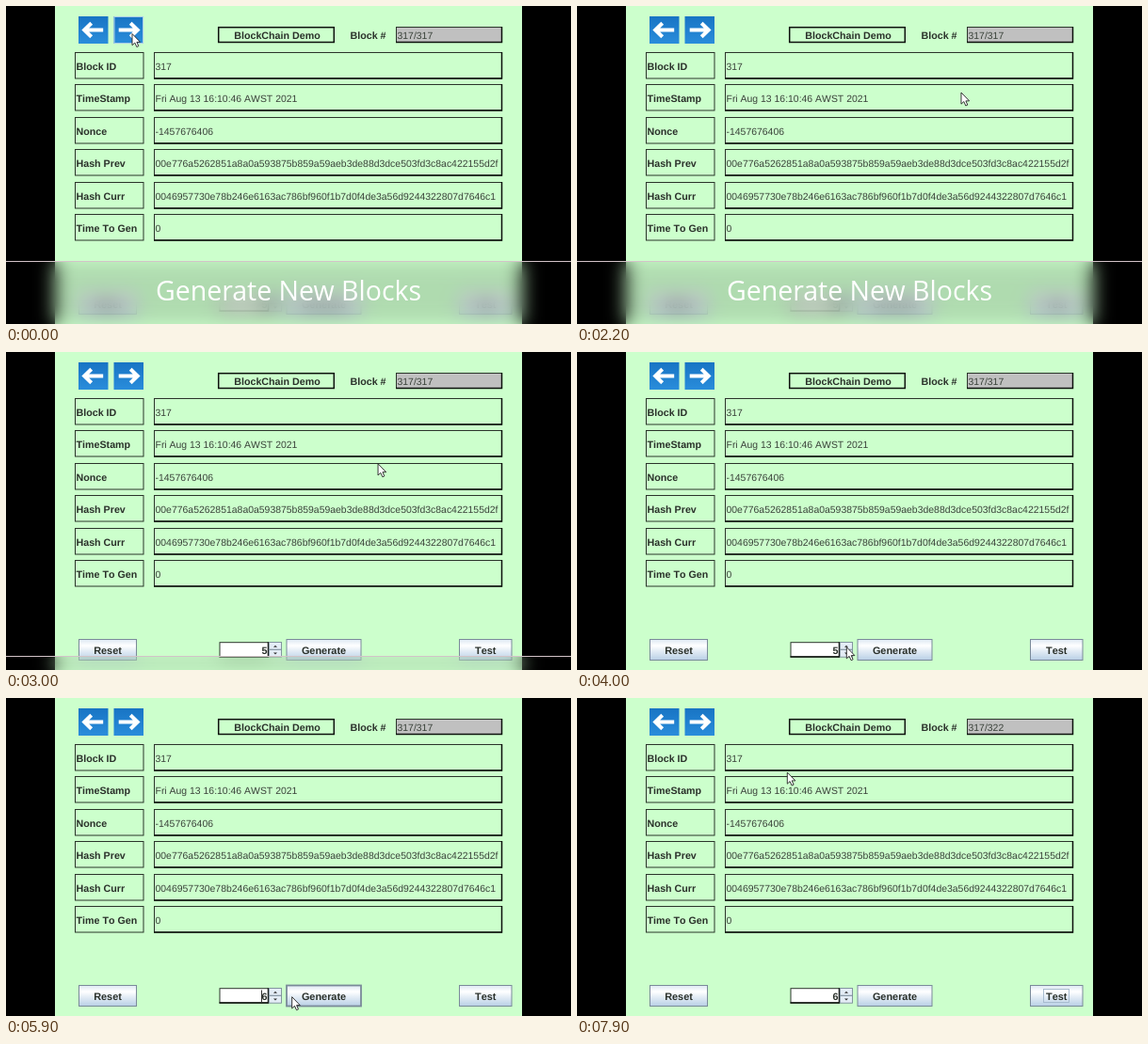
An HTML page that plays this animation: 600x338 px, repeating every 8000 ms.

```html
<!DOCTYPE html>
<html lang="en">
<head>
<meta charset="utf-8">
<title>BlockChain Demo</title>
<style>
html, body { margin: 0; width: 100%; height: 100%; overflow: hidden; background: #000; }
#stage { position: relative; width: 600px; height: 338px; overflow: hidden; background: #000; }
svg { position: absolute; left: 0; top: 0; }
text { font: 10.45px "Liberation Sans", Arial, sans-serif; fill: #3a423a; font-kerning: none;
  white-space: pre; text-rendering: geometricPrecision; }
text.b { font-size: 10.7px; font-weight: bold; fill: #2a302a; }
#panel { position: absolute; left: 0; width: 600px; box-sizing: border-box;
  border-top: 1px solid #d3c3c8; backdrop-filter: blur(10px) brightness(.86); }
#title { position: absolute; left: 0; width: 600px; text-align: center; color: #fff;
  font: 400 28.5px/42px "Open Sans", "Noto Sans", sans-serif; white-space: nowrap; }
</style>
</head>
<body>
<div id="stage">
  <svg id="app" width="600" height="338" viewBox="0 0 600 338">
    <defs>
      <linearGradient id="metal" x2="0" y2="1">
        <stop offset="0" stop-color="#dde8f3"/><stop offset=".3" stop-color="#fff"/>
        <stop offset=".55" stop-color="#e4edf6"/><stop offset="1" stop-color="#b8cfe5"/>
      </linearGradient>
      <linearGradient id="blue" x2="0" y2="1">
        <stop offset="0" stop-color="#1874c4"/><stop offset="1" stop-color="#2a8ddb"/>
      </linearGradient>
    </defs>
  </svg>
  <div id="panel"></div>
  <div id="title">Generate New Blocks</div>
</div>
<script>
const LOOP = 8000;
const app = document.getElementById('app');
const panel = document.getElementById('panel');
const title = document.getElementById('title');

function add(tag, attrs, content) {
  const el = document.createElementNS('http://www.w3.org/2000/svg', tag);
  for (const k in attrs) el.setAttribute(k, attrs[k]);
  if (content !== undefined) el.textContent = content;
  return app.appendChild(el);
}
function box(x1, y1, x2, y2, fill, stroke, width = 1) {
  return add('rect', { x: x1, y: y1, width: x2 - x1, height: y2 - y1, fill, stroke, 'stroke-width': width });
}
const label = (x, y, s, cls = 'b', anchor = 'start') =>
  add('text', { x, y, class: cls, 'text-anchor': anchor }, s);

// Field with heavier right and bottom edges
function field(x1, y1, x2, y2, fill) {
  box(x1, y1, x2, y2, fill, '#2a342a');
  add('path', { d: `M${x2} ${y1 - .5}V${y2}H${x1 - .5}`, fill: 'none', stroke: '#0c100c', 'stroke-width': 1.5 });
}
function button(x1, x2, s) {
  const mid = (x1 + x2) / 2;
  const frame = box(x1 + .5, 305.5, x2 - .5, 327.5, 'url(#metal)', '#7a8a99');
  label(mid, 321, s, 'b', 'middle').style.fontSize = '10.9px';
  return frame;
}
function arrow(x, dir) {
  box(x, 11, x + 31.5, 40, 'url(#blue)', 'none');
  const c = x + 15.7, tip = c + dir * 9.5, back = c - dir * 10.5, wing = c + dir * 2;
  add('path', { d: `M${back} 25.5H${tip - dir * 2}M${wing} 18.2L${tip} 25.5L${wing} 32.8`,
    fill: 'none', stroke: '#fff', 'stroke-width': 4 });
}

box(52, 0, 548, 338, '#cfc', 'none');
arrow(77, -1);
arrow(114.5, 1);
const hover = box(115, 11.5, 145.5, 39.5, 'none', '#a9cbe8');

box(225.7, 22.7, 348.3, 38.5, 'none', '#0c100c', 1.5);
label(288, 35, 'BlockChain Demo', 'b', 'middle');
label(365.5, 35, 'Block #');
field(414.5, 22.5, 526.5, 38.5, '#c0c0c0');
const count = label(415.5, 35, '317/317', '');

[['Block ID', '317'],
 ['TimeStamp', 'Fri Aug 13 16:10:46 AWST 2021'],
 ['Nonce', '-1457676406'],
 ['Hash Prev', '00e776a5262851a8a0a593875b859a59aeb3de88d3dce503fd3c8ac422155d2f'],
 ['Hash Curr', '0046957730e78b246e6163ac786bf960f1b7d0f4de3a56d9244322807d7646c1'],
 ['Time To Gen', '0']
].forEach(([name, value], i) => {
  const y = Math.floor(49.2 + i * 34.45) + .5;
  box(73.5, y, 146, y + 27.5, 'none', '#2a342a');
  field(157.5, y, 526.5, y + 27.5, 'none');
  label(74.5, y + 18.5, name);
  label(158.5, y + 18.5, value, '');
});

button(77, 139, 'Reset');
const generate = button(297.5, 377.5, 'Generate');
button(481, 537.5, 'Test');
const focus = box(495.5, 309.5, 522.5, 323.5, 'none', '#a3b8cc', .9);

field(227, 308.7, 278.5, 324, '#fff');
const amount = label(277.5, 321, '5', 'b', 'end');
const caret = box(271, 310.5, 272, 323, '#333', 'none');
const up = box(279.3, 308.5, 292.5, 316.3, '#e4edf6', '#7a8a99', .9);
box(279.3, 316.3, 292.5, 324.2, '#e4edf6', '#7a8a99', .9);
add('path', { d: 'M284 313.7L286 311.7L288 313.7ZM284 319.5L286 321.5L288 319.5Z', fill: '#333' });

const cursor = add('path', { d: 'M0 0V12.2L2.8 9.6L4.8 14L6.8 13.1L4.9 8.9H8.6Z',
  fill: '#fff', stroke: '#222', 'stroke-width': .9 });

// time, x, y of the pointer tip
const path = [
  [0, 134, 29.5], [250, 134.5, 29.5], [1000, 413, 37], [1200, 419.3, 37.5], [1600, 420, 40],
  [2200, 408, 92], [2600, 405.7, 99.7], [2900, 400, 110], [3700, 287, 311], [4000, 286.3, 313.7],
  [4600, 286.3, 313.7], [5300, 300, 317.7], [5900, 303.7, 317.7], [6300, 332, 317.7],
  [7300, 332, 317.7], [7900, 223.3, 79], [8000, 223.3, 79]
];
const ease = p => p * p * (3 - 2 * p);

function pointer(t) {
  let i = 0;
  while (t >= path[i + 1][0]) i++;
  const [t0, x0, y0] = path[i], [t1, x1, y1] = path[i + 1];
  const p = ease((t - t0) / (t1 - t0));
  return [x0 + (x1 - x0) * p, y0 + (y1 - y0) * p];
}
const show = (el, on) => { el.style.display = on ? '' : 'none'; };

function draw() {
  const t = performance.now() % LOOP;
  const [x, y] = pointer(t);
  cursor.setAttribute('transform', `translate(${x} ${y})`);

  show(hover, x < 147 && y < 41);
  count.textContent = t < 6600 ? '317/317' : '317/322';
  amount.textContent = t < 4300 ? '5' : '6';
  show(caret, t >= 4300 && t < 6300);
  show(focus, t >= 6300);
  up.setAttribute('fill', t >= 4300 && t < 4500 ? '#b8cfe5' : '#e4edf6');
  generate.setAttribute('stroke-width', x > 298 && x < 377 && y > 305 && t < 6300 ? 1.8 : 1);

  const slide = Math.min(1, Math.max(0, (t - 2350) / 850)) * 68;
  panel.style.top = 270.5 + slide + 'px';
  panel.style.height = Math.max(0, 67.5 - slide) + 'px';
  show(panel, slide < 67);
  title.style.top = 281 + slide * 1.25 + 'px';
  requestAnimationFrame(draw);
}
draw();
</script>
</body>
</html>
```
